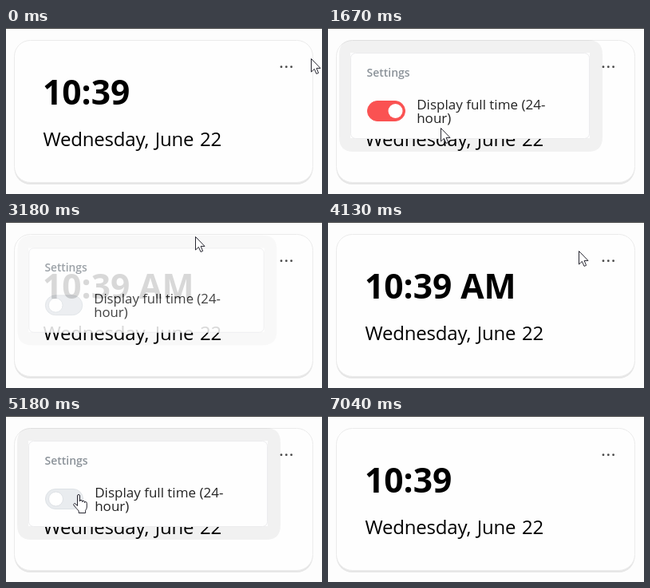
An HTML page that plays this animation: 396 by 208 pixels, repeating every 7450 ms.

```html
<!DOCTYPE html>
<html lang="en">
<head>
<meta charset="utf-8">
<title>Clock widget</title>
<style>
  html, body { margin: 0; width: 100%; height: 100%; overflow: hidden; background: #fdfdfd; }
  svg { display: block; width: 396px; height: 208px; }
  text { font-family: "Open Sans", "Noto Sans", sans-serif; white-space: pre; }
  .time { font-size: 42.5px; font-weight: 700; }
  .date { font-size: 24px; letter-spacing: -.2px; word-spacing: 1.6px; }
  .title { font-size: 14px; font-weight: 600; fill: #8b9299; }
  .label { font-size: 17px; fill: #222; }
  .cursor { fill: #fff; stroke: #1c1c26; stroke-width: .95; stroke-linejoin: round; }
</style>
</head>
<body>
<svg viewBox="0 0 396 208">
  <rect width="396" height="208" fill="#fdfdfd"/>
  <rect width="396" height="1" fill="#404040"/>
  <rect x="10.5" y="17" width="374" height="179" rx="20" fill="#e6e6e6"/>
  <rect x="10.5" y="15.5" width="374" height="178" rx="20" fill="#fefefe" stroke="#ebebeb"/>
  <g fill="#4a4a4a">
    <circle cx="345" cy="48.7" r="1.4"/>
    <circle cx="351.3" cy="48.7" r="1.4"/>
    <circle cx="357.6" cy="48.7" r="1.4"/>
  </g>
  <text class="time" x="46" y="96.3">10:39<tspan id="ampm"> AM</tspan></text>
  <text class="date" x="46.5" y="148">Wednesday, June 22</text>

  <g id="popup">
    <path id="halo" fill-rule="evenodd" fill="#000" fill-opacity=".05"
      d="M32 15H326Q344 15 344 33V137Q344 155 326 155H32Q14 155 14 137V33Q14 15 32 15ZM28 31V138H328V31Z"/>
    <rect x="28.5" y="31.5" width="299" height="107" rx="6" fill="#fefefe" stroke="#ececee"/>
    <text class="title" x="48.5" y="61">Settings</text>
    <rect id="track" x="49.5" y="91.5" width="47" height="25" rx="12.5"/>
    <circle id="knob" cy="104" r="9" fill="#fff"/>
    <text class="label" x="111.2" y="102">Display full time (24-</text>
    <text class="label" x="111.2" y="119">hour)</text>
  </g>

  <path id="arrow" class="cursor" d="M.5 .5V17L4.4 13.4L7 19.4L9.6 18.3L7.1 12.4H12Z"/>
  <path id="hand" class="cursor" d="M5.5 14.5V2Q5.5 .5 7 .5T8.5 2V9Q8.5 7.3 10 7.3T11.5 9V9.6Q11.7 8.2 13 8.2T14.4 9.8V10.6Q14.6 9.3 15.9 9.5T17.3 11.3V16Q17.3 18.3 15.6 20.3V23.5H7.2V21Q4 17.5 1 14Q.2 12.2 1.6 11.7T4 13Z"/>
</svg>
<script>
  const LOOP = 7450;
  const $ = id => document.getElementById(id);

  // [time, shape, x, y]: the pointer jumps and holds
  const pointer = [
    [0, 'arrow', 382, 38], [560, 'arrow', 370, 40], [700, 'hand', 353, 45],
    [830, 'hand', 350, 46], [1530, 'arrow', 198, 113], [1670, 'arrow', 141, 125],
    [1800, 'arrow', 109, 118], [1950, 'hand', 96, 108], [2070, 'hand', 92, 101],
    [2220, 'hand', 83, 94], [2340, 'hand', 91, 98], [2490, 'arrow', 161, 77],
    [2630, 'arrow', 197, 53], [2760, 'arrow', 224, 36], [2910, 'arrow', 234, 26],
    [3030, 'arrow', 237, 22], [3180, 'arrow', 237, 18], [4130, 'arrow', 314, 36],
    [4250, 'arrow', 336, 44], [4370, 'hand', 345, 46], [4520, 'hand', 347, 47],
    [4790, 'arrow', 244, 64], [4940, 'arrow', 148, 92], [5060, 'hand', 98, 96],
    [5180, 'hand', 91, 98], [5470, 'hand', 101, 97], [5620, 'arrow', 151, 53],
    [5770, 'arrow', 184, 39], [5900, 'arrow', 201, 31], [6050, 'arrow', 210, 18],
    [6890, 'arrow', 351, 203], [7040, 'none', 0, 0]
  ];

  // [time, visibility of the settings card]
  const openness = [
    [0, 0], [1260, .7], [1380, 1], [3180, .85], [3300, .35], [3420, 0],
    [4670, .7], [4790, 1], [6180, .5], [6330, 0]
  ];

  // [time, switch position]
  const switching = [[0, 1], [2490, 0], [5470, .12], [5620, 1]];

  const at = (steps, t) => steps.findLast(s => s[0] <= t);
  const mix = (a, b, k) => a + (b - a) * k;
  const blend = (a, b, k) => `rgb(${a.map((v, i) => Math.round(mix(v, b[i], k)))})`;

  function drawPopup(open) {
    const shrink = Math.min(1, (1 - open) / .3);
    const scale = 1 - .03 * shrink;
    $('popup').setAttribute('opacity', open);
    $('popup').setAttribute('transform',
      `matrix(${scale} 0 0 ${scale} ${1.3 * shrink} ${3.7 * shrink})`);
    $('halo').setAttribute('opacity', 1 - .75 * shrink);
  }

  function drawSwitch(on) {
    $('knob').setAttribute('cx', mix(62.5, 84.5, on));
    $('knob').setAttribute('stroke', on < 1 ? '#dee2e6' : 'none');
    $('track').setAttribute('fill', blend([233, 236, 239], [250, 82, 82], on));
    $('track').setAttribute('stroke', blend([222, 226, 230], [250, 82, 82], on));
    $('ampm').style.display = on ? 'none' : '';
  }

  function drawPointer([, shape, x, y]) {
    for (const id of ['arrow', 'hand']) {
      $(id).style.display = id === shape ? '' : 'none';
    }
    if (shape === 'none') return;
    const left = shape === 'hand' ? x - 7 : x;
    $(shape).setAttribute('transform', `translate(${left} ${y})`);
  }

  function render(ms) {
    const t = ms % LOOP;
    drawPopup(at(openness, t)[1]);
    drawSwitch(at(switching, t)[1]);
    drawPointer(at(pointer, t));
  }

  const start = performance.now();
  function tick() {
    render(performance.now() - start);
    requestAnimationFrame(tick);
  }
  tick();
</script>
</body>
</html>
```
